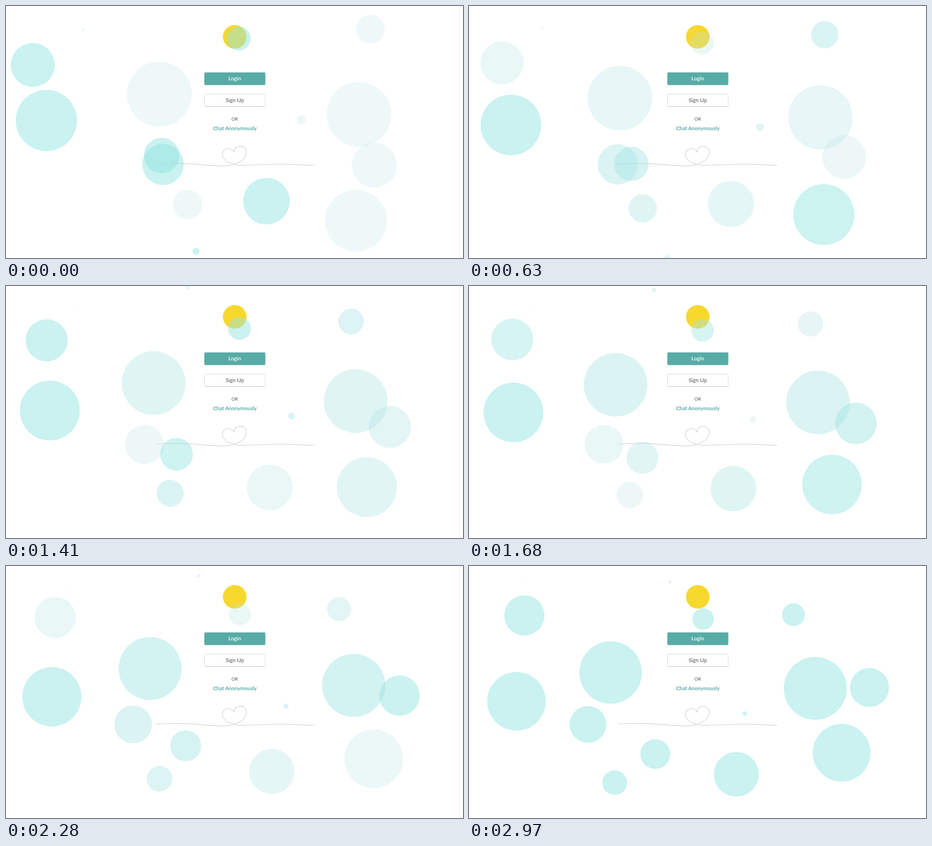
Recreate the animation shown at these times as an HTML page. Size 1007 px wide and 556 px high, loop 3 s.

```html
<!DOCTYPE html>
<html lang="en">
<head>
<meta charset="utf-8">
<title>Welcome</title>
<style>
  html, body { margin: 0; width: 100%; height: 100%; overflow: hidden; background: #fff; }
  svg { display: block; width: 100%; height: 100%; }
  text { font-family: Lato, "Open Sans", sans-serif; font-size: 12px; text-anchor: middle; fill: #4c5154; }
  .login { fill: #fff; font-weight: 600; font-size: 11.8px; }
  .or { font-size: 10px; }
  .chat { fill: #3fa09b; font-weight: 600; font-size: 11.5px; }
</style>
</head>
<body>
<svg viewBox="0 0 1007 556">
  <circle cx="504" cy="68" r="26" fill="#f6d82f"/>
  <path fill="none" stroke="#c8cccd" stroke-width="1.1" stroke-linecap="round"
    d="M330 348.3 C350 348 365 346.3 395 347.6 S452 353 480 352.7 C510 352 529 339 529.5 322
       C530 311 519 307.5 511 310.5 S501 319 504 324
       C500 315 490 313 483 316.5 S475 329 480 336.5 S499 351.8 520 351.6
       S575 349 605 349 S655 351.5 678.5 351.5"/>
  <g id="bubbles"></g>
  <rect x="437" y="146.5" width="134.5" height="28" rx="2.5" fill="#58aca6"/>
  <rect x="437.5" y="194.5" width="133.5" height="27.3" rx="2" fill="#fff" stroke="#d3d6d7"/>
  <path d="M439 222h131" stroke="#c9cccd"/>
  <text class="login" x="504" y="164">Login</text>
  <text x="504" y="212">Sign Up</text>
  <text class="or" x="504" y="252.5">OR</text>
  <text class="chat" x="504.5" y="274">Chat Anonymously</text>
</svg>
<script>
const LOOP = 3000, STEP = 30, SPAN = 97;
const HEIGHT = 556, EDGE = 6.5, WRAP_SHIFT = 60;
const PALE = [187, 225, 226], BRIGHT = [147, 229, 225];

const mix = (a, b, p) => a + (b - a) * p;
const group = document.getElementById("bubbles");
const bubbles = [];

// Drifts from (x, y) by (dx, dy). Longer trips shrink more; each newer bubble flickers faster.
function bubble(x, y, r, dx, dy) {
  const node = group.appendChild(document.createElementNS("http://www.w3.org/2000/svg", "circle"));
  const shrink = Math.min(r, 0.06 * Math.hypot(dx, dy));
  const fades = Math.round(0.62 * bubbles.length);
  bubbles.push({ node, x, y, r, dx, dy, shrink, fades });
}

bubble(89, 252.5, 66, 15.5, 46);
bubble(338, 194.5, 70.3, -26, 40.5);
bubble(777.5, 239, 70.3, -14.5, 31);
bubble(346, 349.5, 43, -84, 0);
bubble(169.5, 52, 1.3, -42, -14);
bubble(803, 51, 28.3, -88, 56.5);
bubble(59, 130, 46.3, 63, -21);
bubble(513, 72, 25, 3, 45);
bubble(771, 473.5, 66, 50, -61.5);
bubble(574, 430.5, 50.3, 15, 29);
bubble(419, 541, 5, 84, 63);
bubble(650.5, 251, 7.3, -43, 74.5);
bubble(400, 438, 29.8, -79, 40);
bubble(343, 330, 36, 67.5, 85);
bubble(811.5, 351, 46.3, 71, -83);

function draw(ms) {
  const p = Math.min(1, Math.floor((ms % LOOP) / STEP) / SPAN);
  for (const b of bubbles) {
    let x = b.x + b.dx * p, y = b.y + b.dy * p;
    if (y > HEIGHT + EDGE) {
      x -= WRAP_SHIFT;
      y -= HEIGHT + 2 * EDGE;
    }
    // triangle wave; every bubble is brightest at the end of the loop
    const glow = Math.abs(1 - b.fades * (1 - p) % 2);
    const attrs = {
      cx: x, cy: y, r: b.r + b.shrink * (0.5 - p),
      fill: `rgb(${PALE.map((c, i) => Math.round(mix(c, BRIGHT[i], glow)))})`,
      "fill-opacity": mix(0.25, 0.5, glow)
    };
    for (const name in attrs) b.node.setAttribute(name, attrs[name]);
  }
}

let start;
function tick(now) {
  start ??= now;
  draw(now - start);
  requestAnimationFrame(tick);
}
draw(0);
requestAnimationFrame(tick);
</script>
</body>
</html>
```
